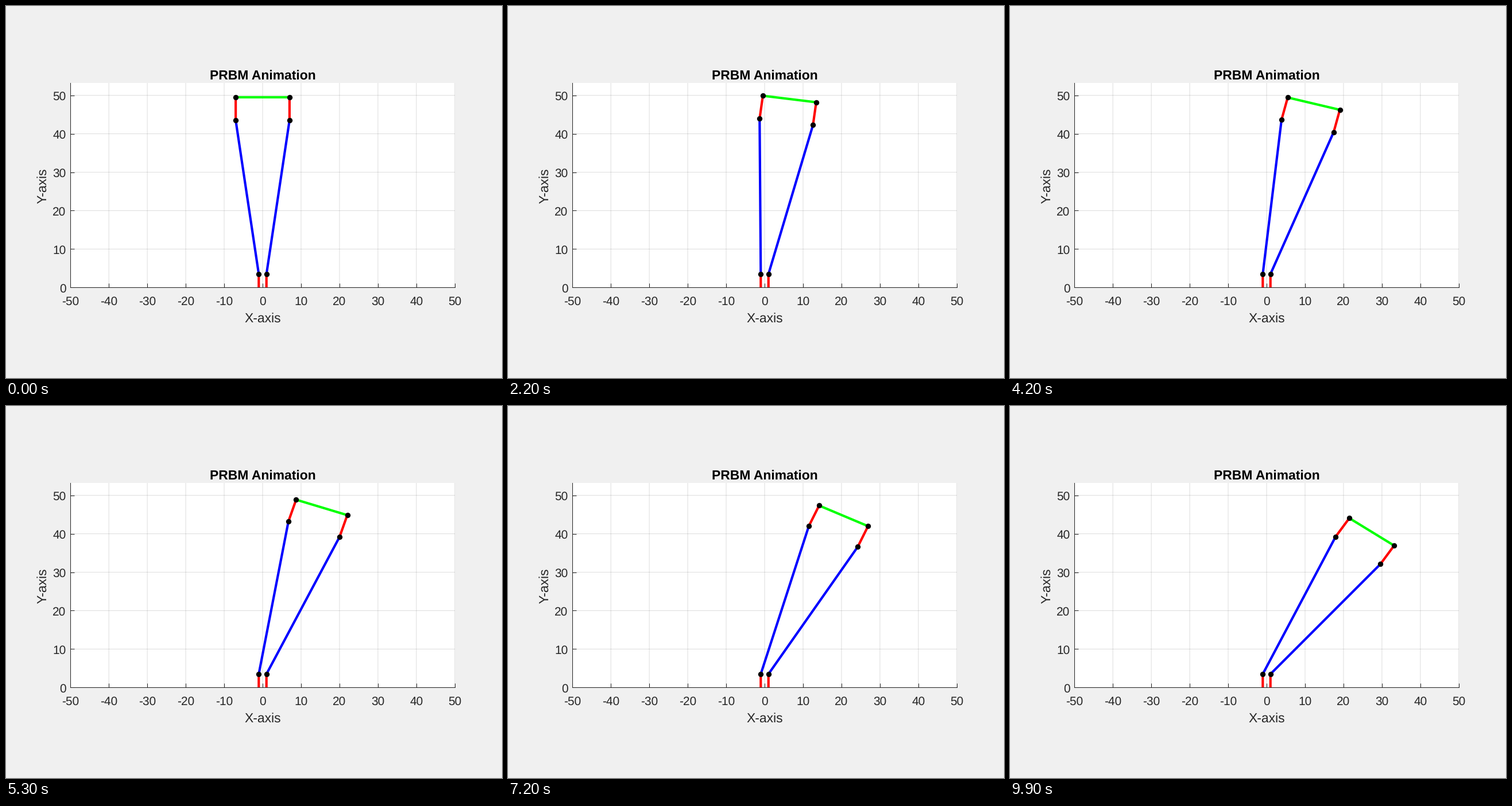
Write a matplotlib script that moves like this. It is 864x648 px and loops after 10000 ms.

```python
import numpy as np
import matplotlib.pyplot as plt
from matplotlib.animation import FuncAnimation

W, H, DPI = 864, 648, 150
FRAMES = 100
LEFT, RIGHT, TOP, BOTTOM = 112.2, 781.8, 133.8, 490.4
SCALE = (RIGHT - LEFT) / 100
INK = (0.15, 0.15, 0.15)

# Linkage dimensions in axis units
BASE_X, BASE_Y = 1, 3.5
LINK = np.hypot(6, 40)
TIP = 6
SPLAY = np.arctan2(6, 40)
SWING = np.pi / 4 - SPLAY

plt.rcParams.update({"font.family": "Liberation Sans",
                     "text.hinting": "none"})
fig = plt.figure(figsize=(W / DPI, H / DPI), dpi=DPI, facecolor=(0.94,) * 3)
ax = fig.add_axes([LEFT / W, 1 - BOTTOM / H,
                   (RIGHT - LEFT) / W, (BOTTOM - TOP) / H])
ax.set(xlim=(-50, 50), ylim=(0, (BOTTOM - TOP) / SCALE),
       xticks=range(-50, 51, 10), yticks=range(0, 51, 10))
ax.set_axisbelow(True)
ax.grid(color=INK, alpha=0.15, lw=0.5, snap=False)
ax.tick_params(direction="in", length=3.2, width=0.5, color=INK,
               labelbottom=False, labelleft=False)
for side, spine in ax.spines.items():
    spine.set(visible=side in ("left", "bottom"), color=INK, linewidth=0.5,
              zorder=1.5)


def label(x, y, text, size=10, ha="center", color=INK, **kw):
    """Place text by its baseline, in pixels from the top left."""
    fig.text(x / W, 1 - y / H, text, fontsize=size, ha=ha, va="baseline",
             color=color, **kw)


MID = (LEFT + RIGHT) / 2
for v in range(-50, 51, 10):
    label(MID + v * SCALE, 521, str(v))
for v in range(0, 51, 10):
    label(104.5, BOTTOM - v * SCALE + 8.3, str(v), ha="right")
label(MID, 551, "X-axis", 11)
label(70, (TOP + BOTTOM) / 2 + 1, "Y-axis", 11, rotation=90,
      rotation_mode="anchor")
label(MID, 127.6, "PRBM Animation", 11, color="black", weight="bold")


def bar(color):
    return ax.plot([], [], color=color, lw=2, solid_capstyle="butt",
                   snap=False, zorder=3)[0]


for x in (-BASE_X, BASE_X):
    bar("#ff0000").set_data([x, x], [0, BASE_Y])
links = [bar("#0000ff") for _ in range(2)]
tips = [bar("#ff0000") for _ in range(2)]
coupler = bar("#00ff00")
joints = ax.scatter([], [], s=4.5 ** 2, color="black", lw=0, snap=False,
                    zorder=4)


def polar(length, angle):
    """Vector at an angle measured clockwise from vertical."""
    return length * np.array([np.sin(angle), np.cos(angle)])


def update(i):
    turn = SWING * i / (FRAMES - 1)
    points, ends = [], []
    for side, link, tip in zip((-1, 1), links, tips):
        a = np.array([side * BASE_X, BASE_Y])
        b = a + polar(LINK, turn + side * SPLAY)
        c = b + polar(TIP, turn)
        link.set_data(*zip(a, b))
        tip.set_data(*zip(b, c))
        points += [a, b, c]
        ends.append(c)
    coupler.set_data(*zip(*ends))
    joints.set_offsets(points)
    return [*links, *tips, coupler, joints]


anim = FuncAnimation(fig, update, frames=FRAMES, interval=100,
                     repeat=True, repeat_delay=0, blit=False)
plt.show()
```
